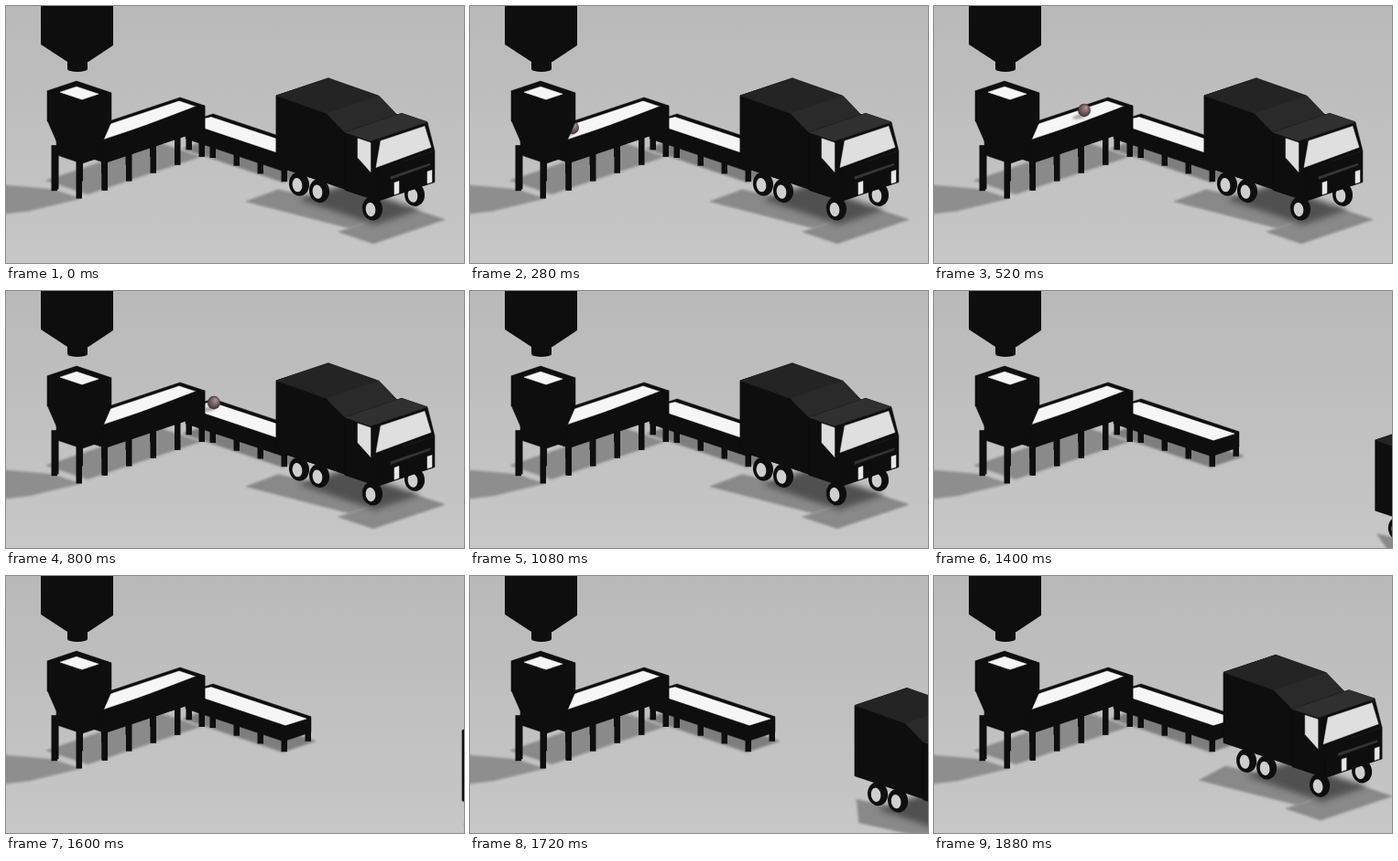
An HTML page with a canvas for the animation above (1.92 s loop, 500 px wide and 281 px high).

```html
<!DOCTYPE html>
<html lang="en">
<head>
<meta charset="utf-8">
<title>Conveyor and truck</title>
<style>
html, body { margin: 0; width: 100%; height: 100%; overflow: hidden; background: #c0c0c0; }
canvas { display: block; }
</style>
</head>
<body>
<canvas id="stage" width="500" height="281"></canvas>
<script>
const ctx = document.getElementById('stage').getContext('2d');
const LOOP = 1920, STEP = 40, SLOPE = 0.335;
const INK = '#0e0e0e', WHITE = '#f6f6f6';

// Ball stops: time, x, y, and 1 where the ball falls towards the next stop
const stops = [
  [0, 78, 60, 1], [160, 80, 92, 0], [280, 112, 133, 0], [520, 164, 114, 0],
  [710, 205, 100, 1], [790, 224, 121, 0], [1060, 304, 149, 0]
];

// Floor axes: a runs right and down, b right and up; z is height
const project = ([a, b, z = 0]) => [a + b, SLOPE * (a - b) - z];

function shape(color, points) {
  ctx.beginPath();
  points.forEach(p => ctx.lineTo(...project(p)));
  ctx.closePath();
  ctx.fillStyle = ctx.strokeStyle = color;
  ctx.lineWidth = 0.5;
  ctx.fill();
  ctx.stroke();
}

function slab(color, a0, a1, b0, b1, z = 0) {
  shape(color, [[a0, b0, z], [a0, b1, z], [a1, b1, z], [a1, b0, z]]);
}

// Outline of a box whose base is smaller by the taper on each side
function box(a0, a1, b0, b1, z0, z1, taper = 0) {
  const c0 = a0 + taper, c1 = a1 - taper, d0 = b0 + taper, d1 = b1 - taper;
  shape(INK, [[a0, b0, z1], [a0, b1, z1], [a1, b1, z1], [c1, d1, z0], [c1, d0, z0], [c0, d0, z0]]);
}

// Side profile of [a, z] points pulled along b; roofs colour the first edges
function prism(profile, width, roofs) {
  const edge = (color, i) => {
    const [a, z] = profile[i], [c, y] = profile[(i + 1) % profile.length];
    shape(color, [[a, 0, z], [c, 0, y], [c, width, y], [a, width, z]]);
  };
  profile.forEach((_, i) => edge(INK, i));
  shape(INK, profile.map(([a, z]) => [a, 0, z]));
  roofs.forEach(edge);
}

function leg(a, b, height) {
  const [x, y] = project([a, b]);
  ctx.fillStyle = INK;
  ctx.fillRect(x - 6.5, y - height, 6.5, height);
}

function oval(color, x, y, rx, ry, turn = 0) {
  ctx.fillStyle = color;
  ctx.beginPath();
  ctx.ellipse(x, y, rx, ry, turn, 0, 7);
  ctx.fill();
}

function at(x, y, draw) {
  ctx.save();
  ctx.translate(x, y);
  draw();
  ctx.restore();
}

function soft(radius, draw) {
  ctx.filter = `blur(${radius}px)`;
  draw();
  ctx.filter = 'none';
}

function ground() {
  const light = ctx.createLinearGradient(0, 0, 0, 281);
  light.addColorStop(0, '#b9b9b9');
  light.addColorStop(1, '#c7c7c7');
  ctx.fillStyle = light;
  ctx.fillRect(0, 0, 500, 281);
}

function lowerConveyor() {
  soft(1, () => slab('#7e7e7e', -21, 88, -3, 33));
  for (let i = 0; i < 5; i++) leg(-14 + i * 26, 0, 20);
  leg(86, 30, 20);
  box(-21, 86, 0, 30, 10, 27);
  shape(WHITE, [[-21, 28, 24], [84, 27, 25], [86, 2, 27], [-21, 2, 27]]);
}

function upperConveyor() {
  soft(1, () => {
    slab('#8a8a8a', -48, -3, -125, -2);
    shape('#8e8e8e', [[-64, -156], [-30, -136], [0, -136], [-8, -184], [-18, -205], [-66, -156]]);
  });
  for (let i = 0; i < 5; i++) {
    leg(-27, -(i + 1) * 26.5, 40);
    leg(0, -i * 26.5, 40);
  }
  box(-27, 0, -109, 0, 30, 56);
  slab(WHITE, -26, -5, -112, -2, 53);
}

function upperWall() {
  shape(INK, [[0, -109, 54], [-4, -2, 56], [0, 0, 56], [0, 0, 30], [0, -109, 30]]);
}

function hopper() {
  leg(-25, -136, 50);
  leg(1, -135, 50);
  leg(2, -108, 50);
  box(-29, -1, -133, -111, 37, 55);
  box(-34, 4, -138, -106, 52, 75, 5);
  box(-34, 4, -138, -106, 74, 107);
  slab(WHITE, -31, -7, -127, -109, 103);
}

function silo() {
  ctx.fillStyle = INK;
  ctx.fillRect(67, 58, 22, 11);
  oval(INK, 78, 69, 11, 3);
  ctx.fill(new Path2D('M38,0H117V43L90,61H67L38,42z'));
}

function wheel(a, b = 0) {
  const [x, y] = project([a, b, 12]);
  oval(INK, x + 2, y - 1, 11, 13, -0.15);
  oval('#cfcfcf', x, y, 5.3, 7.7, -0.15);
}

function truck(d) {
  // The rear of the shadow shortens as the truck drives off
  soft(1, () => {
    shape('#898989', [[4 + d * 0.3, -37], [104, -24], [104, 20], [2, 0]]);
    slab('#898989', 104, 142, -36, 42);
  });
  soft(3, () => slab('#505050', 30, 112, -4, 44));
  wheel(103, 46);
  prism([[0, 102], [55, 101], [75, 87], [75, 25], [0, 25]], 57, ['#242424', '#2a2a2a']);
  prism([[75, 87], [103, 87], [111, 58], [111, 24], [75, 24]], 62, ['#303030']);
  shape('#dedede', [[89, 0, 85], [103, 0, 85], [103, 0, 53], [89, 0, 64]]);
  shape('#dfdfdf', [[104, 10, 84], [104, 58, 84], [109, 60, 62], [109, 0, 60]]);
  shape('#353535', [[111, 14, 46], [111, 57, 46], [111, 57, 44], [111, 14, 43]]);
  for (const b of [18, 54]) {
    shape('#e8e8e8', [[111, b, 38], [111, b + 5, 38], [111, b + 5, 25], [111, b, 25]]);
  }
  [23, 45, 103].forEach(a => wheel(a));
}

function ballAt(t) {
  const i = stops.findIndex((s, n) => stops[n + 1] && t >= s[0] && t < stops[n + 1][0]);
  if (i < 0) return null;
  const [t0, x0, y0, falls] = stops[i], [t1, x1, y1] = stops[i + 1];
  const u = (t - t0) / (t1 - t0);
  return { x: x0 + (x1 - x0) * u, y: y0 + (y1 - y0) * (falls ? u * u : u), rolls: !falls };
}

function ball({ x, y, rolls }) {
  if (rolls) soft(1, () => oval('#aaa', x - 5, y + 7, 8, 2.5, -0.2));
  const skin = ctx.createRadialGradient(x + 2, y - 3, 1, x, y, 7.5);
  skin.addColorStop(0, '#a58c8c');
  skin.addColorStop(0.5, '#755f5f');
  skin.addColorStop(1, '#3c3030');
  oval(skin, x, y, 7, 7.2);
}

function frame(now) {
  const t = Math.floor(now % LOOP / STEP) * STEP;
  const spot = ballAt(t), dropping = t < stops[1][0];
  const drive = Math.max(0, 260 - 0.65 * Math.abs(t - 1512.5));
  ground();
  at(217, 162, lowerConveyor);
  at(217, 165, upperConveyor);
  if (spot && !dropping) ball(spot);
  at(217, 165, upperWall);
  at(217, 165, hopper);
  if (dropping) ball(spot);
  silo();
  at(295 + drive, 200 + drive * 0.348, () => truck(drive));
  requestAnimationFrame(frame);
}

requestAnimationFrame(frame);
</script>
</body>
</html>
```
